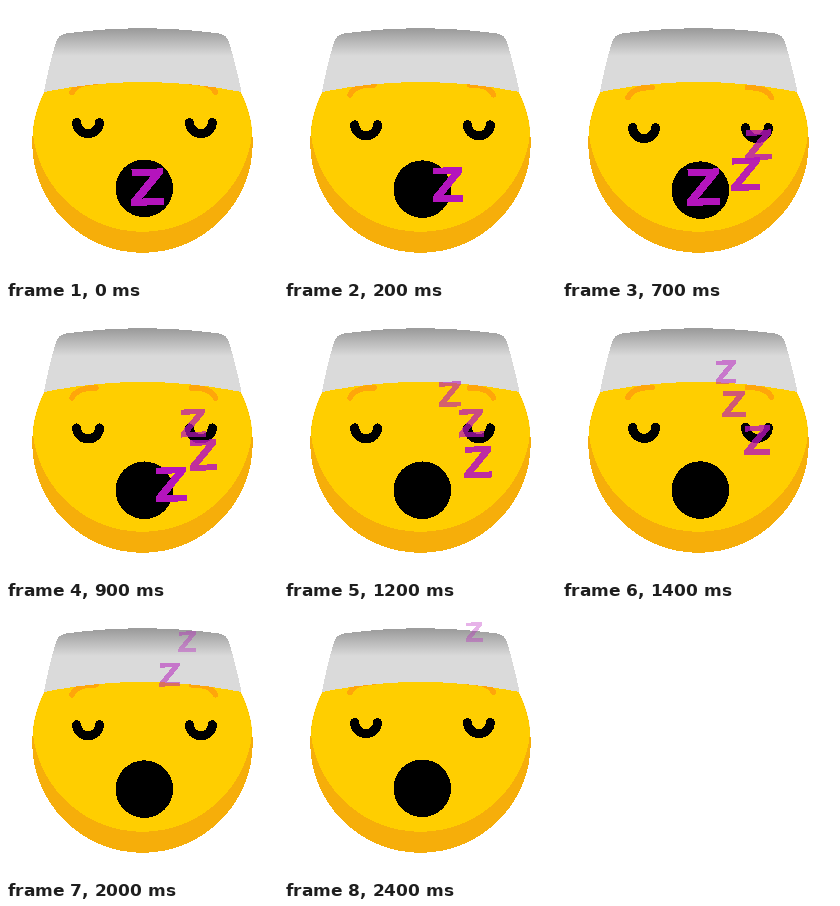
Recreate the animation shown at these times as an HTML page. Size 272 by 272 pixels, loop 2600 ms.

```html
<!DOCTYPE html>
<html lang="en">
<head>
<meta charset="utf-8">
<title>Sleepy face</title>
<style>
  html, body { margin: 0; width: 100%; height: 100%; overflow: hidden; background: #fff; }
  svg { display: block; width: 100vw; height: 100vh; }
</style>
</head>
<body>
<svg viewBox="0 0 272 272" shape-rendering="crispEdges">
  <defs>
    <clipPath id="head"><circle cx="136.5" cy="136.5" r="110.3"/></clipPath>
    <linearGradient id="cloth" gradientUnits="userSpaceOnUse" x1="0" y1="24" x2="0" y2="50">
      <stop offset="0" stop-color="#9d9d9d"/>
      <stop offset="1" stop-color="#dadada"/>
    </linearGradient>
    <path id="zed" fill="#b414bc" d="M-15.5-17.5 15.5-18.7V-13L-4.500 11.500 16.500 11V18L-16 19V13L4-11.500-15.500-10.500Z"/>
  </defs>
  <circle cx="136.5" cy="136.5" r="110.3" fill="#f6ae0a"/>
  <circle cx="136.5" cy="115.5" r="110.3" fill="#ffce00" clip-path="url(#head)"/>
  <g fill="none" stroke-linecap="round">
    <path id="brows" stroke="#ffa60a" stroke-width="5.6" d="M66 86.5Q71 76 90 76.5M209.5 86.5Q204.5 76 185.5 76.5"/>
    <path id="eyes" stroke="#000" stroke-width="9" d="M70.7 116.5a11.4 11 0 0 0 22.8 0M183.5 116.5a11.4 11 0 0 0 22.8 0"/>
  </g>
  <circle id="mouth" cx="138.3" cy="182.3" r="28.8"/>
  <path fill="url(#cloth)" d="M38 86Q43 59 50 36Q52 29 60 27.5Q136 17 213 27.5Q221 29 223 36Q230 59 235.5 86Q136 66 38 86Z"/>
  <use class="snore" href="#zed"/>
  <use class="snore" href="#zed"/>
  <use class="snore" href="#zed"/>
</svg>
<script>
const LOOP = 2600, STEP = 100, LAST = 24;
const route = [[141, 181], [174, 175], [197, 149], [187, 117], [166, 88], [166.5, 55], [190, 26]];
const spans = [[0, 18], [3, 21], [7, 24]];
const snores = document.querySelectorAll('.snore');
const byId = id => document.getElementById(id);
const brows = byId('brows'), eyes = byId('eyes'), mouth = byId('mouth');

const shiftDown = (el, dy) => el.setAttribute('transform', `translate(0 ${dy})`);

// Catmull-Rom curve through the route; progress runs from 0 to 1
function pointAt(progress) {
  const last = route.length - 1;
  const i = Math.min(last - 1, Math.floor(progress * last));
  const u = progress * last - i;
  return [0, 1].map(axis => {
    const b = route[i][axis], c = route[i + 1][axis];
    const a = i > 0 ? route[i - 1][axis] : 2 * b - c;
    const d = i + 2 <= last ? route[i + 2][axis] : 2 * c - b;
    return b + u / 2 * (c - a + u * (2 * a - 5 * b + 4 * c - d + u * (3 * (b - c) + d - a)));
  });
}

function draw(time) {
  const step = Math.min(LAST, Math.floor(time % LOOP / STEP));
  // The breath sinks a little faster than it rises
  const breath = Math.sin(Math.PI * (step / LAST) ** 0.8);
  shiftDown(brows, 5.5 * breath);
  shiftDown(eyes, 5.5 * breath);
  shiftDown(mouth, 2 * breath);

  snores.forEach((snore, i) => {
    const [start, end] = spans[i];
    const progress = (step - start) / (end - start);
    const visible = progress >= 0 && progress <= 1;
    snore.setAttribute('visibility', visible ? 'visible' : 'hidden');
    if (!visible) return;
    const [x, y] = pointAt(progress);
    snore.setAttribute('transform', `translate(${x} ${y}) scale(${1 - 0.47 * progress})`);
    snore.setAttribute('opacity', Math.min(1, 1.1 - 0.78 * progress));
  });
}

const begin = performance.now();
function tick() {
  draw(performance.now() - begin);
  requestAnimationFrame(tick);
}
tick();
</script>
</body>
</html>
```
